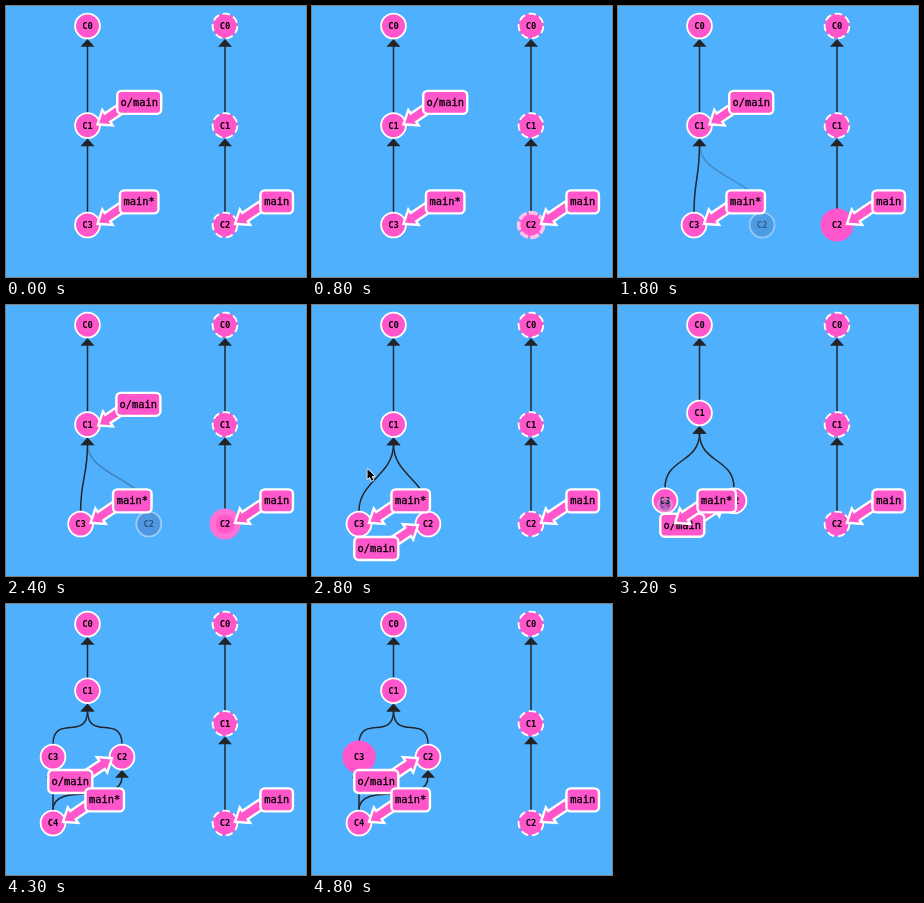
An HTML page with a canvas that plays this animation: 300x271 px, repeating every 4900 ms.

```html
<!DOCTYPE html>
<html lang="en">
<head>
<meta charset="utf-8">
<title>Commit graph</title>
<style>
html, body { margin: 0; width: 100%; height: 100%; overflow: hidden; background: #4fb0fe; }
canvas { display: block; width: 300px; height: 271px; }
</style>
</head>
<body>
<canvas id="stage"></canvas>
<script>
const W = 300, H = 271, LOOP = 4900, STEP = 100;
const BG = '#4fb0fe', INK = '#222428';
const PINK = [255, 86, 204], WHITE = [255, 255, 255], GHOST = [40, 130, 190];
const MONO = '"DejaVu Sans Mono", "Liberation Mono", monospace';
const LEFT = 81.5, RIGHT = 219, R = 12.4;

const canvas = document.getElementById('stage');
const ctx = canvas.getContext('2d');
const dpr = window.devicePixelRatio || 1;
canvas.width = Math.round(W * dpr);
canvas.height = Math.round(H * dpr);

const lerp = (a, b, k) => a + (b - a) * k;
const rgb = c => `rgb(${c.map(Math.round).join(',')})`;
const mix = (a, b, k) => rgb(a.map((v, i) => lerp(v, b[i], k)));

// Eased value from [time, value] pairs
function track(t, ...keys) {
  if (t <= keys[0][0]) return keys[0][1];
  for (let i = 1; i < keys.length; i++) {
    const [t0, v0] = keys[i - 1], [t1, v1] = keys[i];
    if (t <= t1) {
      const k = (t - t0) / (t1 - t0);
      return lerp(v0, v1, k * k * (3 - 2 * k));
    }
  }
  return keys[keys.length - 1][1];
}

function write(text, x, y, font, weight = 0) {
  ctx.font = font;
  ctx.textAlign = 'center';
  ctx.textBaseline = 'alphabetic';
  ctx.fillStyle = ctx.strokeStyle = '#000';
  ctx.fillText(text, x, y);
  if (weight) {
    ctx.lineWidth = weight;
    ctx.strokeText(text, x, y);
  }
}

function polygon(points) {
  ctx.beginPath();
  points.forEach(([x, y]) => ctx.lineTo(x, y));
  ctx.closePath();
}

function edge(child, parent, alpha = 1) {
  if (alpha <= 0 || child.y - parent.y < 34) return;
  const top = parent.y + 13, base = top + 7.7, start = child.y - 13;
  ctx.save();
  ctx.globalAlpha = Math.min(1, alpha * 1.6);
  ctx.strokeStyle = ctx.fillStyle = INK;
  ctx.lineWidth = 1.5;
  ctx.beginPath();
  ctx.moveTo(child.x, start);
  if (child.x === parent.x) ctx.lineTo(parent.x, base - 1);
  else ctx.bezierCurveTo(child.x, start - 30, parent.x, base + 30, parent.x, base - 1);
  ctx.stroke();
  polygon([[parent.x, top], [parent.x + 7, base], [parent.x - 7, base]]);
  ctx.fill();
  ctx.restore();
}

function node(name, { x, y, r = R, glow = 0, born = 1, dashed = false }) {
  if (born <= 0) return;
  ctx.save();
  ctx.globalAlpha = Math.sqrt(born);
  ctx.beginPath();
  ctx.arc(x, y, r, 0, Math.PI * 2);
  ctx.fillStyle = mix(GHOST, PINK, born);
  ctx.fill();
  if (dashed && glow < 0.6) {
    const gap = 3.8 * (1 - glow / 0.6);
    ctx.setLineDash([11.13 - gap, gap]);
  }
  ctx.strokeStyle = mix(WHITE, PINK, Math.min(1, glow * 1.4));
  ctx.lineWidth = 1.8 + 7 * glow;
  ctx.stroke();
  write(name, x, y + 3.2, `bold 8.8px ${MONO}`);
  ctx.restore();
}

// side runs from 1 (label up right of the node) to -1 (down left)
function label(text, w, at, side = 1) {
  const tip = [10, -1.2], u = [0.83, -0.557];
  const point = (along, across) => [
    at.x + side * (tip[0] + u[0] * along - u[1] * across),
    at.y + side * (tip[1] + u[1] * along + u[0] * across)
  ];
  const paint = () => {
    ctx.fillStyle = rgb(PINK);
    ctx.strokeStyle = '#fff';
    ctx.lineWidth = 2.4;
    ctx.fill();
    ctx.stroke();
  };
  ctx.lineJoin = 'miter';
  polygon([[0, 0], [12, -9.3], [12, -5], [32, -5], [32, 5], [12, 5], [12, 9.3]]
    .map(p => point(...p)));
  paint();

  const x = at.x + 51.7 * side, y = at.y + 0.7 - 23.8 * side, h = 23;
  ctx.beginPath();
  ctx.roundRect(x - w / 2, y - h / 2, w, h, 4.5);
  paint();
  ctx.lineJoin = 'round';
  write(text, x, y + 3.3, `10.4px ${MONO}`, 0.3);
}

function cursor(x, y) {
  polygon([[0, 0], [0, 10], [2.3, 8], [4.1, 11.8], [5.8, 11], [4.1, 7.3], [7.2, 7]]
    .map(([dx, dy]) => [x + dx, y + dy]));
  ctx.lineWidth = 1.6;
  ctx.strokeStyle = '#fff';
  ctx.stroke();
  ctx.fillStyle = '#000';
  ctx.fill();
}

function remoteSide(t) {
  const glow = track(t, [600, 0], [1200, 1], [1800, 0.9], [2400, 0.6], [2700, 0]);
  const c0 = { x: RIGHT, y: 20, dashed: true };
  const c1 = { x: RIGHT, y: 119.5, dashed: true };
  const c2 = { x: RIGHT, y: 219, dashed: true, glow };
  edge(c1, c0);
  edge(c2, c1);
  node('C0', c0);
  node('C1', c1);
  node('C2', c2);
  label('main', 32.5, c2);
}

function localSide(t) {
  const split = track(t, [1500, 0], [1800, 0.16], [2400, 0.2], [2700, 1]);
  const ref = track(t, [2300, 0], [2400, 0.02], [2800, 1]);
  const lift = track(t, [3000, 0], [3500, 1]);
  const merge = track(t, [3100, 0], [3500, 0.6], [3900, 1]);
  const glow = track(t, [4300, 0], [4800, 0.95]);

  const rowY = lerp(219, 153, lift);
  const c0 = { x: LEFT, y: 20 };
  const c1 = { x: LEFT, y: lerp(119.5, 86.7, lift) };
  const c3 = { x: lerp(LEFT, 47, split), y: rowY, glow };
  const c2 = { x: lerp(149.5, 116, split), y: rowY, born: split };
  const c4 = {
    x: 47,
    y: lerp(rowY, 219, 1 - (1 - merge) ** 2),
    r: R * (0.5 + merge / 2),
    born: merge
  };

  edge(c1, c0);
  edge(c3, c1);
  edge(c2, c1, split);
  edge(c4, c3, merge);
  edge(c4, c2, merge);
  node('C0', c0);
  node('C1', c1);
  node('C3', c3);
  node('C2', c2);
  node('C4', c4);

  const refAt = { x: lerp(c1.x, c2.x, ref), y: lerp(c1.y, c2.y, ref) };
  label('o/main', 44, refAt, 1 - 2 * ref);
  label('main*', 38.5, { x: c3.x, y: 219 });
  if (t >= 2600 && t < 3000) cursor(55.5, 164);
}

function draw(t) {
  ctx.setTransform(dpr, 0, 0, dpr, 0, 0);
  ctx.fillStyle = BG;
  ctx.fillRect(0, 0, W, H);
  remoteSide(t);
  localSide(t);
}

let start;
function tick(now) {
  if (start === undefined) start = now;
  draw(Math.floor(((now - start) % LOOP) / STEP) * STEP);
  requestAnimationFrame(tick);
}
draw(0);
requestAnimationFrame(tick);
</script>
</body>
</html>
```
